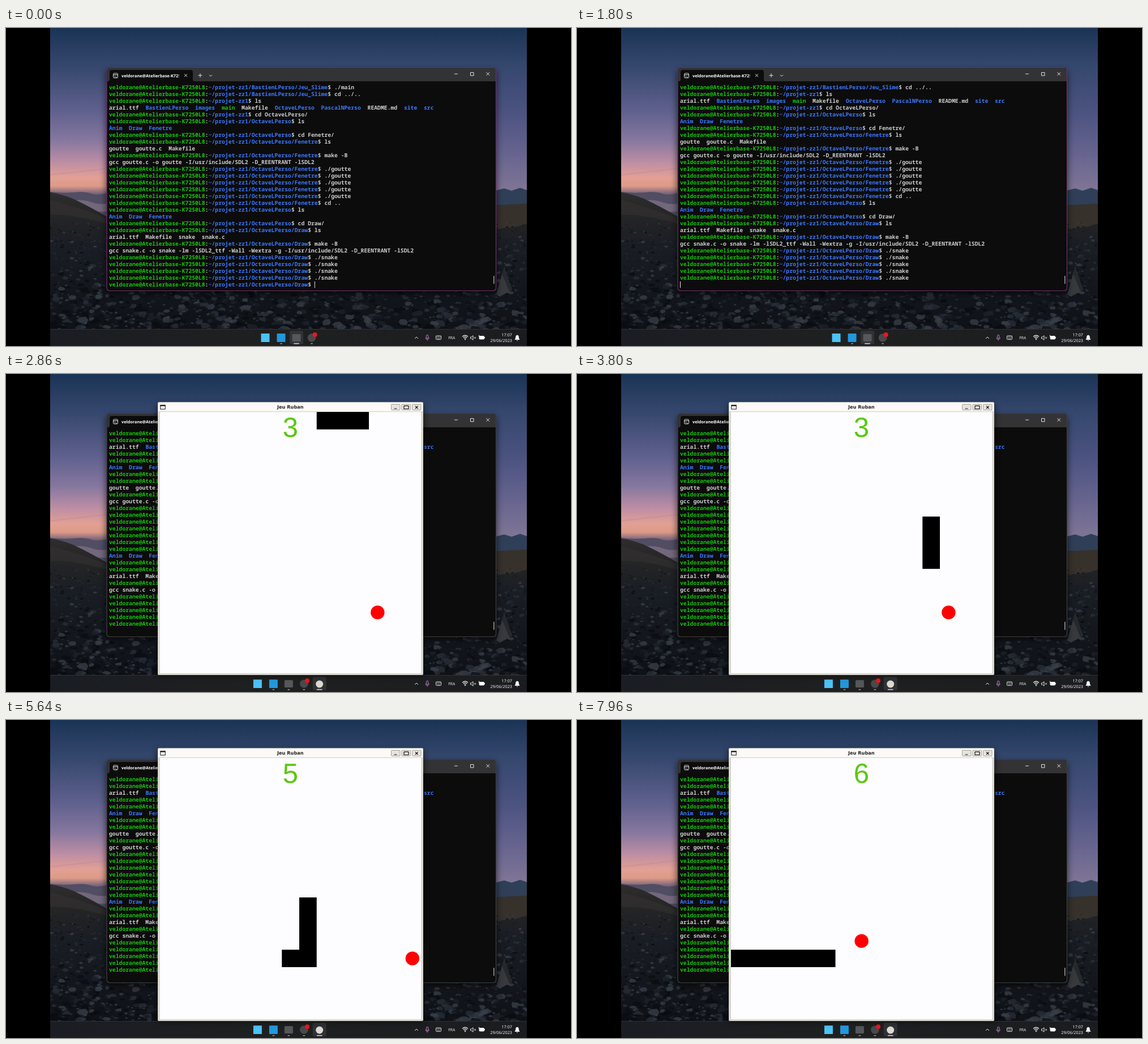
An HTML page for the animation above (8 s loop, 998 px wide and 561 px high).

```html
<!DOCTYPE html>
<html lang="fr">
<head>
<meta charset="utf-8">
<style>
html, body { margin: 0; width: 100%; height: 100%; overflow: hidden; background: #000; }
svg { display: block; width: 100vw; height: 100vh; }
text { white-space: pre; text-rendering: geometricPrecision; }
.mono { font: 600 9.755px "Noto Sans Mono", "DejaVu Sans Mono", monospace; }
.mono .b { font-weight: 700; }
.ui { font-family: "Open Sans", "Noto Sans", sans-serif; fill: #fff; }
.line { fill: none; stroke: #e4e4e4; stroke-width: 1; }
</style>
</head>
<body>
<svg viewBox="0 0 998 561" preserveAspectRatio="none">
  <defs>
    <linearGradient id="sky" gradientUnits="userSpaceOnUse" x1="0" y1="0" x2="0" y2="300">
      <stop offset="0" stop-color="#1a3455"/><stop offset=".233" stop-color="#36486e"/>
      <stop offset=".5" stop-color="#62628f"/><stop offset=".66" stop-color="#86779f"/>
      <stop offset=".79" stop-color="#bd8ea4"/><stop offset=".88" stop-color="#e3a094"/>
      <stop offset=".93" stop-color="#dc9a88"/><stop offset=".97" stop-color="#80697b"/>
      <stop offset="1" stop-color="#55506a"/>
    </linearGradient>
    <linearGradient id="east" gradientUnits="userSpaceOnUse" x1="0" y1="0" x2="0" y2="300">
      <stop offset="0" stop-color="#1a3455"/><stop offset=".233" stop-color="#36486e"/>
      <stop offset=".5" stop-color="#4c5380"/><stop offset=".75" stop-color="#67658f"/>
      <stop offset="1" stop-color="#857997"/>
    </linearGradient>
    <linearGradient id="land" gradientUnits="userSpaceOnUse" x1="0" y1="290" x2="0" y2="531">
      <stop offset="0" stop-color="#2f2d2e"/><stop offset=".2" stop-color="#232425"/>
      <stop offset=".4" stop-color="#191d24"/><stop offset="1" stop-color="#0e1217"/>
    </linearGradient>
    <linearGradient id="bar" x1="0" y1="0" x2="1" y2="0">
      <stop offset="0" stop-color="#1a1d23"/><stop offset=".5" stop-color="#1f2020"/>
      <stop offset="1" stop-color="#1a1c1f"/>
    </linearGradient>
    <filter id="soft" x="-20%" y="-20%" width="140%" height="140%"><feGaussianBlur stdDeviation="6"/></filter>
    <clipPath id="screen"><rect x="78" width="842" height="561"/></clipPath>
    <clipPath id="rows"><rect x="179" y="98" width="685" height="364"/></clipPath>
    <clipPath id="tab"><rect x="203" y="76" width="102.5" height="16"/></clipPath>
  </defs>
  <rect width="998" height="561"/>
  <g clip-path="url(#screen)">
    <rect x="78" width="842" height="340" fill="url(#sky)"/>
    <rect x="700" width="220" height="340" fill="url(#east)"/>
    <path d="M78 258Q120 253 178 247L178 249Q120 256 78 260Z" fill="#b9879a" opacity=".4"/>
    <path d="M78 289Q100 292 120 290T150 292T180 291V340H78Z" fill="#514d63"/>
    <path d="M112 305Q134 301 150 307T180 309V324H130Z" fill="#7f7184" opacity=".75"/>
    <path d="M860 288L880 283L893 287L908 282L920 286V320H860Z" fill="#303f58"/>
    <path d="M78 290Q98 293 118 301Q150 316 180 334H860V313L920 310V540H78Z" fill="url(#land)"/>
    <path d="M860 313L920 310V345Q890 356 860 352Z" fill="#37312c"/>
    <path d="M78 304Q115 312 180 336V346Q120 328 78 330Z" fill="#343131" opacity=".6"/>
    <g id="rocks"></g>
    <path d="M866 470L880 420L894 462L872 474Z" fill="#37393d"/>
    <path d="M880 420L894 462L889 464L876 433Z" fill="#25282c"/>
    <rect x="78" y="531" width="842" height="30" fill="url(#bar)"/>
    <path d="M78 531.5H920" stroke="#35373b" stroke-width=".8"/>
  </g>

  <g id="terminal">
    <rect x="176" y="74" width="691" height="396" rx="7" opacity=".55" filter="url(#soft)"/>
    <rect id="frame" x="178" y="69.5" width="687.5" height="394" rx="5" fill="#0c0c0c" stroke-width="1.2"/>
    <path d="M178.6 94V75Q178.6 70 183.6 70H860Q865 70 865 75V94Z" fill="#333336"/>
    <path d="M180 94Q183 94 183 91V78Q183 74 187 74H326Q330 74 330 78V91Q330 94 333 94Z" fill="#0c0c0c"/>
    <g class="line">
      <rect x="189.5" y="80" width="8" height="8" rx="1.5"/>
      <path d="M189.5 82.5H197.5M191.5 84.5L193 85.6L191.5 86.8M194 86.8H196"/>
      <path d="M315 81.2L320 86.2M320 81.2L315 86.2M339.5 83.7H346.5M343 80.2V87.2M359 82.7L361.5 85.2L364 82.7"/>
      <path d="M792 81H798M820.5 78.5H826V84H820.5ZM848.5 78.2L854 83.7M854 78.2L848.5 83.7"/>
    </g>
    <text class="ui" x="204" y="86.8" font-size="7.3" font-weight="700" clip-path="url(#tab)">veldorane@Atelierbase-K7250L8</text>
    <g clip-path="url(#rows)"><g id="lines" class="mono"></g></g>
    <rect id="caret" y="447" width="1" height="11.5" fill="#e8e8e8"/>
    <rect x="861" y="437" width="1.6" height="14.5" rx=".8" fill="#9a9a9a"/>
  </g>

  <g id="apps"></g>
  <g class="line" id="tray">
    <path d="M722 548L725 545L728 548"/>
    <path d="M742.6 543Q742.6 541.3 744.2 541.3T745.8 543V546Q745.8 547.6 744.2 547.6T742.6 546ZM741 546Q741 549.3 744.2 549.3T747.4 546M744.2 549.3V551.5" stroke="#c07cc4"/>
    <rect x="759.5" y="543" width="9" height="6.5" rx="1"/>
    <path d="M761 545H767.5M761.5 547.5H766.5" stroke-dasharray="1.2 .7"/>
    <path d="M806 544.5Q811 540 816 544.5M807.7 546.5Q811 543.5 814.3 546.5M809.5 548.4Q811 547 812.5 548.4" stroke-width="1.2"/>
    <circle cx="811" cy="549.5" r=".6" fill="#fff"/>
    <path d="M820.5 545H822.3L825 542.7V550.3L822.3 548H820.5ZM827 545L830 548M830 545L827 548"/>
    <rect x="836" y="543.5" width="8.5" height="5.5" rx="1" fill="#fff"/>
    <path d="M845.5 545V547.5M835.5 541.5V545"/>
    <path d="M899 549.5Q900.5 548 900.5 545.5Q900.5 542 903 542T905.5 545.5Q905.5 548 907 549.5ZM902 551.2H904" fill="#fff"/>
  </g>
  <g class="ui">
    <text x="787.3" y="549.2" font-size="6.8" text-anchor="middle">FRA</text>
    <text x="894" y="543.9" font-size="7.3" text-anchor="end">17:07</text>
    <text x="894" y="553.9" font-size="7.3" text-anchor="end">29/06/2023</text>
  </g>

  <g id="game">
    <rect x="267" y="54" width="471" height="478" opacity=".55" filter="url(#soft)"/>
    <rect x="268" y="49.5" width="469" height="481.5" rx="2" fill="#d9d7cf"/>
    <path d="M268.8 66V52Q268.8 50.3 270.5 50.3H734.5Q736.2 50.3 736.2 52V66Z" fill="#fbfaf7"/>
    <path d="M269 66.3H736" stroke="#d4d2ca" stroke-width=".8"/>
    <rect x="272" y="67" width="461.3" height="461" fill="#fdfcfe"/>
    <rect x="272.8" y="55" width="8.4" height="7" fill="#fff" stroke="#111"/>
    <path d="M272.5 55.8H281.5" stroke="#111" stroke-width="1.8"/>
    <g fill="#e6e4de" stroke="#8f8d87" stroke-width=".8">
      <rect x="680.5" y="53.5" width="15.5" height="10" rx="1"/>
      <rect x="699" y="53.5" width="15.5" height="10" rx="1"/>
      <rect x="717.5" y="53.5" width="15.5" height="10" rx="1"/>
    </g>
    <path d="M685.5 61H690.5M703 56.2H711M703 56V61.5H711V56M723 56.3L727.7 61M727.7 56.3L723 61" fill="none" stroke="#111" stroke-width="1.2"/>
    <text x="502.3" y="61" text-anchor="middle" font-family="DejaVu Sans, sans-serif" font-weight="700" font-size="8.2" fill="#222">Jeu Ruban</text>
    <text id="score" x="502.5" y="111.3" text-anchor="middle" font-family="Liberation Sans, Arial, sans-serif" font-size="49" fill="#5ac80f"></text>
    <path id="snake"/>
    <circle id="food" r="12.2" fill="#f00"/>
  </g>
</svg>
<script>
const LOOP = 8000, RECALL = 1000, ENTER = 1420, OPEN = 1860, ICON = 2300;
const $ = id => document.getElementById(id);
const NS = 'http://www.w3.org/2000/svg';
function add(parent, tag, attrs, text) {
  const el = document.createElementNS(NS, tag);
  for (const k in attrs) el.setAttribute(k, attrs[k]);
  if (text) el.textContent = text;
  parent.appendChild(el);
  return el;
}

// Boulders, larger towards the viewer
let seed = 29;
const rnd = () => (seed = (seed * 16807) % 2147483647) / 2147483647;
const shades = ['#0a0d12', '#1d222a', '#2a3039', '#3a404a', '#12161c'];
for (let i = 0; i < 2600; i++) {
  const x = 78 + rnd() * 842, y = 342 + (i / 2600) * 192;
  const r = (1 + (y - 340) / 45) * (0.4 + 1.3 * rnd() ** 2);
  const hidden = x > 186 && x < 858 && y < 455;
  let d = '';
  for (let k = 0; k < 6; k++) {
    const a = k * Math.PI / 3, q = r * (0.65 + rnd() * 0.6);
    d += (k ? 'L' : 'M') + (x + q * 1.3 * Math.cos(a)).toFixed(1) + ' ' + (y + q * 0.75 * Math.sin(a)).toFixed(1);
  }
  const fill = shades[Math.floor(rnd() * 5)];
  if (!hidden) add($('rocks'), 'path', { d: d + 'Z', fill, opacity: 0.75 });
}

// Terminal contents
const CHAR = 5.853, LEFT = 182, ROW = 12;
const GREEN = '#16c60c', BLUE = '#3b78ff', GREY = '#cccccc';
const HOST = 'veldorane@Atelierbase-K7250L8', ROOT = '~/projet-zz1';
const ME = ROOT + '/OctaveLPerso', MATE = ROOT + '/BastienLPerso/Jeu_Slime';
let row = 0;
function print(...parts) {
  let col = 0, el;
  for (const [fill, text] of parts) {
    const attrs = { x: LEFT + col * CHAR, y: 108 + row * ROW, fill };
    if (fill !== GREY) attrs.class = 'b';
    el = add($('lines'), 'text', attrs, text);
    col += text.length;
  }
  row++;
  return el;
}
const prompt = (path, cmd) => print([GREEN, HOST], [GREY, ':'], [BLUE, path], [GREY, '$ ' + cmd]);
const out = text => print([GREY, text]);
const dirs = () => print([BLUE, 'Anim  Draw  Fenetre']);

prompt(MATE, './main');
prompt(MATE, 'cd ../..');
prompt(ROOT, 'ls');
print([GREY, 'arial.ttf  '], [BLUE, 'BastienLPerso  images  '], [GREEN, 'main  '], [GREY, 'Makefile  '],
  [BLUE, 'OctaveLPerso  PascalNPerso  '], [GREY, 'README.md  '], [BLUE, 'site  src']);
prompt(ROOT, 'cd OctaveLPerso/');
prompt(ME, 'ls');
dirs();
prompt(ME, 'cd Fenetre/');
prompt(ME + '/Fenetre', 'ls');
out('goutte  goutte.c  Makefile');
prompt(ME + '/Fenetre', 'make -B');
out('gcc goutte.c -o goutte -I/usr/include/SDL2 -D_REENTRANT -lSDL2');
for (let i = 0; i < 5; i++) prompt(ME + '/Fenetre', './goutte');
prompt(ME + '/Fenetre', 'cd ..');
prompt(ME, 'ls');
dirs();
prompt(ME, 'cd Draw/');
prompt(ME + '/Draw', 'ls');
out('arial.ttf  Makefile  snake  snake.c');
prompt(ME + '/Draw', 'make -B');
out('gcc snake.c -o snake -lm -lSDL2_ttf -Wall -Wextra -g -I/usr/include/SDL2 -D_REENTRANT -lSDL2');
for (let i = 0; i < 4; i++) prompt(ME + '/Draw', './snake');
const input = prompt(ME + '/Draw', '');

// Taskbar
const apps = $('apps');
const glow = add(apps, 'rect', { y: 534, width: 24, height: 24, rx: 3, fill: '#303235' });
add(apps, 'rect', { x: 450.5, y: 539, width: 15, height: 15, fill: '#4cc2f5' });
add(apps, 'rect', { x: 478.5, y: 539, width: 15, height: 15, rx: 1, fill: '#2397dc' });
add(apps, 'rect', { x: 505.5, y: 540, width: 15, height: 13, rx: 1.5, fill: '#55575a' });
add(apps, 'circle', { cx: 540, cy: 546.5, r: 7.3, fill: '#48494c' });
add(apps, 'circle', { cx: 545.6, cy: 541, r: 4, fill: '#f0141e' });
const gameIcon = add(apps, 'circle', { cx: 567.3, cy: 547, r: 6.5, fill: '#dcdad2' });
for (const x of [486, 513, 540]) add(apps, 'rect', { x: x - 2, y: 556, width: 4, height: 1.6, rx: 0.8, fill: '#9b9b9b' });
const active = add(apps, 'rect', { y: 555.8, width: 10, height: 2, rx: 1, fill: '#d69bd2' });

// Snake route on a 15 by 15 board with wrapping edges
const N = 15, CELL = 30.75, BX = 272, BY = 67, START = 1900, STEP = 106.5;
const route = [[0, 0], [1, 0], [2, 0]];
const turn = { R: [1, 0], D: [0, 1], U: [0, -1] };
for (const leg of 'R9 D11 R12 U6 R5 D6 R7'.split(' ')) {
  const [dx, dy] = turn[leg[0]];
  for (let k = +leg.slice(1); k > 0; k--) {
    const [x, y] = route[route.length - 1];
    route.push([(x + dx + N) % N, (y + dy + N) % N]);
  }
}
const foods = [[12, 11], [8, 9], [14, 11], [7, 10]];
const meals = foods.slice(0, 3).reduce((steps, [x, y]) => {
  const from = steps.length ? steps[steps.length - 1] + 3 : 0;
  return [...steps, route.findIndex((c, i) => i >= from && c[0] === x && c[1] === y) - 2];
}, []);

function drawGame(t) {
  const step = Math.max(0, Math.min(route.length - 3, Math.floor((t - START) / STEP)));
  const eaten = meals.filter(m => step >= m).length, size = 3 + eaten;
  $('snake').setAttribute('d', route.slice(step + 3 - size, step + 3).map(([x, y]) =>
    `M${BX + x * CELL} ${BY + y * CELL}h${CELL}v${CELL}h${-CELL}z`).join(''));
  $('score').textContent = size;
  const [fx, fy] = foods[eaten];
  $('food').setAttribute('cx', BX + (fx + 0.5) * CELL);
  $('food').setAttribute('cy', BY + (fy + 0.5) * CELL);
}

const show = (el, on) => el.setAttribute('display', on ? 'inline' : 'none');
function draw(t) {
  const open = t >= OPEN, sent = t >= ENTER;
  const typed = t >= RECALL ? './snake ' : '';
  input.textContent = '$ ' + typed;
  $('lines').setAttribute('transform', `translate(0 ${sent ? -ROW : 0})`);
  $('caret').setAttribute('x', LEFT + (sent ? 0 : 62 + typed.length) * CHAR);
  show($('caret'), !open);
  $('frame').setAttribute('stroke', open ? '#414143' : '#74306f');

  const slide = Math.max(0, Math.min(1, (t - OPEN) / 100));
  apps.setAttribute('transform', `translate(${-13.6 * slide} 0)`);
  const focus = open ? 567.3 : 513;
  glow.setAttribute('x', focus - 12);
  active.setAttribute('x', focus - 5);
  show(gameIcon, t >= ICON);
  show($('game'), open);
  drawGame(t);
}

const begin = performance.now();
function tick(now) {
  draw(Math.max(0, now - begin) % LOOP);
  requestAnimationFrame(tick);
}
draw(0);
requestAnimationFrame(tick);
</script>
</body>
</html>
```
